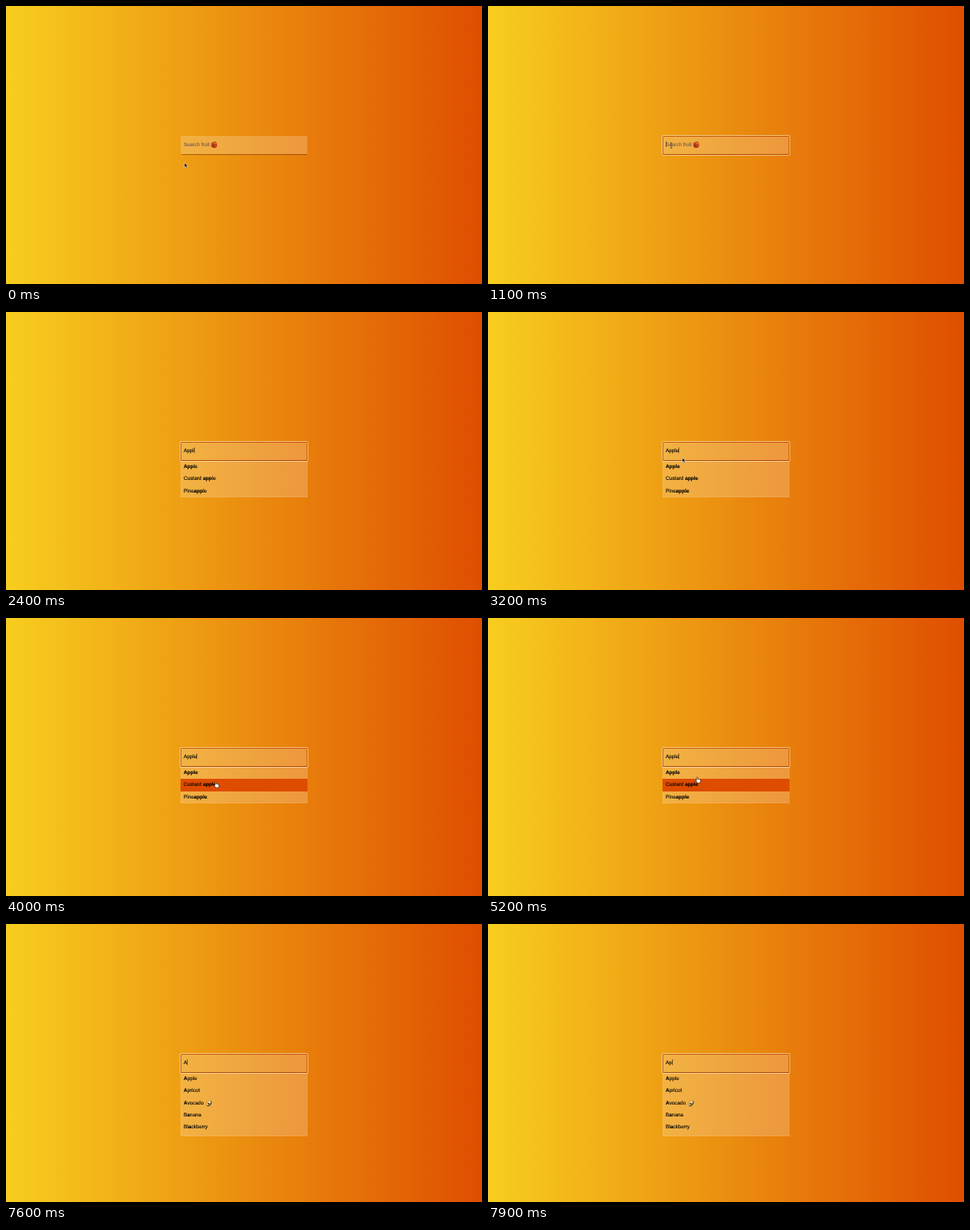
Animation of 600x351 px, one loop 8000 ms. Source, as an HTML page:

```html
<!DOCTYPE html>
<html lang="en">
<head>
<meta charset="utf-8">
<title>Fruit search</title>
<style>
  html, body { margin: 0; width: 100%; height: 100%; overflow: hidden; }
  body {
    position: relative;
    background: linear-gradient(to right, #f7ce1f, #df4e00);
    font: 6.4px/15.25px "Liberation Sans", Arial, sans-serif;
    text-rendering: geometricPrecision;
    -webkit-text-stroke: .12px;
    color: #000;
  }
  #field, #list {
    position: absolute; left: 220px; width: 160px;
    background: rgba(255, 255, 255, .2);
  }
  #field {
    top: 164px; height: 23px; line-height: 23px;
    padding-left: 4px; box-sizing: border-box; white-space: pre;
    box-shadow: 0 .5px 1px rgba(110, 45, 0, .55);
  }
  #ring {
    position: absolute; inset: 0 -.4px -.8px .4px; border-radius: 1.5px;
    box-shadow: 0 0 0 1px rgba(255, 240, 200, .6), inset 0 0 0 .9px rgba(180, 62, 0, .75);
  }
  #hint { position: absolute; left: 4px; color: #765b50; }
  #hint svg { position: absolute; left: 34px; top: 7px; }
  #caret {
    display: inline-block; width: 1px; height: 7px;
    vertical-align: -1.3px; background: rgba(30, 12, 0, .6);
  }
  .picked { background: #a9c3e4; }
  #list {
    top: 188px; max-height: 79.5px; overflow: hidden;
    box-shadow: inset 0 0 0 .5px rgba(255, 235, 190, .25);
  }
  .row { height: 15.25px; padding-left: 4px; white-space: pre; position: relative; }
  .row.hot { background: #de4c00; }
  .row svg { position: absolute; left: 32px; top: 3.5px; }
  #mouse { position: absolute; left: 0; top: 0; overflow: visible; }
</style>
</head>
<body>
<div id="field"><div id="ring"></div><span id="hint">Search fruit<svg width="9" height="9"><circle cx="4.4" cy="4.4" r="3.8" fill="#c7401c"/><path d="M1 5.5Q3 8.6 6.4 7.6Q3.8 6.3 3 3Z" fill="#8c3a16"/><path d="M4 2Q6 1.4 7 3.4" stroke="#ef9a3c" fill="none"/><path d="M5 .8l1.6-.6" stroke="#5e6a20"/></svg></span><span id="text"></span><span id="caret"></span></div>
<div id="list"></div>
<svg id="mouse" width="10" height="10" stroke-linejoin="round">
  <path id="arrow" d="M0 0V5.8L1.4 4.6L2.4 6.9L3.4 6.4L2.5 4.3H4.3Z" fill="#111" stroke="#fff" stroke-width=".45"/>
  <path id="beam" d="M-1.3-3.5Q0-3.5 0-2.7Q0-3.5 1.3-3.5M0-2.7V2.7M-1.3 3.5Q0 3.5 0 2.7Q0 3.5 1.3 3.5" fill="none" stroke="#2b1a10" stroke-width=".6"/>
  <path id="hand" d="M.5.6Q1.2-.2 1.8.7V3Q2.6 2.5 3.1 3.2Q3.9 2.8 4.3 3.5Q5.4 3.3 5.4 4.3V5.7L4.7 7.8H1.6L-.5 5Q-.4 4 .5 4.6Z" fill="#fff" stroke="#111" stroke-width=".6"/>
</svg>
<script>
const LOOP = 8000, STEP = 100;
const fruits = ["Apple", "Apricot", "Avocado", "Banana", "Blackberry",
  "Blackcurrant", "Custard apple", "Grape", "Grapefruit", "Pineapple"];

// Each table holds [time, value]; a value lasts until the next entry.
const typed = [[0, ""], [1700, "A"], [2000, "Ap"], [2200, "App"], [2400, "Appl"],
  [2500, "Apple"], [7000, ""], [7600, "A"], [7900, "Ap"]];
const query = [[0, ""], [1700, "A"], [2100, "Ap"], [2300, "App"], [2500, "Appl"],
  [2600, "Apple"], [5900, ""], [7600, "A"]];
const hover = [[0, -1], [3400, 0], [3800, 1], [4400, 2], [4700, 1],
  [5300, 0], [5400, 1], [5800, 0], [5900, -1]];
const caretOn = [[0, 0], [700, 1], [1300, 0], [1700, 1], [3400, 0], [3900, 1],
  [4400, 0], [4900, 1], [5400, 0], [6500, 1], [6700, 0], [7000, 1]];

// Pointer: [time, x, y, shape]
const path = [
  [0, 225, 198, "arrow"], [100, 242, 177, "beam"], [200, 242, 177, "beam"],
  [300, 238, 184, "beam"], [400, 231, 176, "beam"], [1300, 231, 176, "beam"],
  [1400, 246, 178, ""], [3000, 246, 178, "beam"], [3200, 245, 184, "arrow"],
  [3300, 243, 188, "arrow"], [3400, 240, 193, "hand"], [3600, 261, 201, "hand"],
  [3700, 261, 201, "hand"], [4000, 263, 206.5, "hand"], [4400, 263, 222, "hand"],
  [4600, 263, 221, "hand"], [4800, 263, 211, "hand"], [5200, 262.5, 200.5, "hand"],
  [5300, 262, 197, "hand"], [5500, 262, 212, "hand"], [5600, 261, 216, "hand"],
  [5700, 261, 216, "hand"], [5800, 263, 198, "hand"], [5900, 263, 198, "arrow"],
  [6100, 263, 198, "arrow"], [6300, 262, 193, "arrow"], [6400, 249, 185, "arrow"],
  [6500, 241, 176, "beam"], [6900, 241, 176, "beam"], [7000, 241, 176, ""],
  [LOOP, 241, 176, ""]];

const avocado = '<svg width="8" height="9"><g transform="rotate(38 4 4.5)">' +
  '<ellipse cx="4" cy="4.5" rx="2.7" ry="4" fill="#4a4318"/>' +
  '<ellipse cx="3.4" cy="4.4" rx="1.9" ry="3.4" fill="#f0dd9a"/>' +
  '<circle cx="3.8" cy="5.2" r="1.2" fill="#5f3010"/></g></svg>';

const el = id => document.getElementById(id);
const [ring, hint, text, caret, list, mouse] =
  ["ring", "hint", "text", "caret", "list", "mouse"].map(el);
const at = (table, t) => table.findLast(e => e[0] <= t)[1];

function row(name, q) {
  const i = name.toLowerCase().indexOf(q.toLowerCase()), j = i + q.length;
  return `<div class="row">${name.slice(0, i)}<b>${name.slice(i, j)}</b>${name.slice(j)}` +
    (name === "Avocado" ? avocado : "") + "</div>";
}

let shown = null;
function drawList(q, hot) {
  if (q !== shown) {
    const hits = q ? fruits.filter(f => f.toLowerCase().includes(q.toLowerCase())) : [];
    list.innerHTML = hits.slice(0, 6).map(f => row(f, q)).join("");
    shown = q;
  }
  [...list.children].forEach((r, i) => r.classList.toggle("hot", i === hot));
}

function drawMouse(t) {
  const i = path.findLastIndex(k => k[0] <= t);
  const [t0, x0, y0, shape] = path[i], [t1, x1, y1] = path[i + 1];
  const f = (t - t0) / (t1 - t0);
  mouse.style.transform = `translate(${x0 + (x1 - x0) * f}px, ${y0 + (y1 - y0) * f}px)`;
  for (const s of mouse.children) s.style.display = s.id === shape ? "" : "none";
}

function render(t) {
  const value = at(typed, t);
  text.textContent = value;
  text.className = t >= 6700 && t < 7000 ? "picked" : "";
  hint.style.display = value ? "none" : "";
  caret.style.visibility = at(caretOn, t) ? "visible" : "hidden";
  ring.style.opacity = Math.max(0, Math.min(1, (t - 600) / 500));
  drawList(at(query, t), at(hover, t));
  drawMouse(t);
}

const start = performance.now();
function tick() {
  const t = (performance.now() - start) % LOOP;
  render(Math.floor(t / STEP) * STEP);
  requestAnimationFrame(tick);
}
tick();
</script>
</body>
</html>
```
